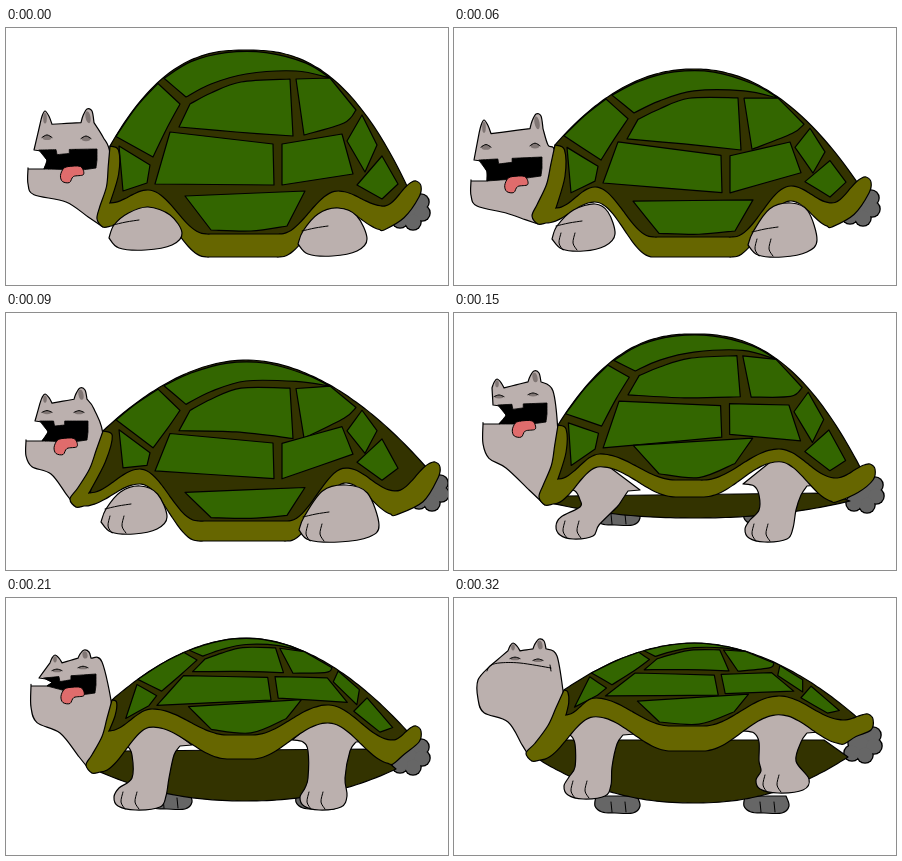
An HTML page with a canvas for the animation above (0.36 s loop, 442 px wide and 257 px high).

```html
<!DOCTYPE html>
<html lang="en">
<head>
<meta charset="utf-8">
<title>Turtle</title>
<style>
  html, body { margin: 0; width: 100%; height: 100%; overflow: hidden; background: #fff; }
  canvas { display: block; width: 442px; height: 257px; }
</style>
</head>
<body>
<canvas id="stage"></canvas>
<script>
const W = 442, H = 257, LOOP = 360, MID = 240;
const DARK = '#333300', GREEN = '#336600', RIM = '#666600';
const SKIN = '#bbb0ae', GREY = '#666666', SHADE = '#807674', TONGUE = '#e06c6c';

// Joints of each pose; every outline is built from them.
// paws: left, right, ground. Standing poses also have a belly and far feet.
const poses = [
  {
    until: 60, top: 22, bow: 2.5, sag: 206, thick: 23, toes: 0,
    tip: [104, 118], notch: [104, 175], foot: [97, 199], arches: [[142, 162], [332, 163]], dip: [378, 178], end: [410, 153],
    paws: [[103, 176, 222], [292, 361, 228]],
    ears: [[39, 83], [82, 81]], lip: [28, 122], hinge: [91, 121], jaw: [22, 141], throat: [60, 174]
  },
  {
    until: 90, top: 41, bow: 2.1, sag: 209, thick: 20, toes: 2,
    tip: [101, 117], notch: [102, 180], foot: [84, 196], arches: [[141, 159], [337, 158]], dip: [378, 175], end: [412, 149],
    paws: [[98, 161, 223], [294, 363, 229]],
    ears: [[30, 92], [83, 86]], lip: [20, 132], hinge: [88, 129], jaw: [17, 153], throat: [52, 185]
  },
  {
    until: 150, top: 47, bow: 1.9, sag: 208, thick: 20, toes: 2,
    tip: [97, 118], notch: [83, 180], foot: [70, 194], arches: [[134, 156], [340, 155]], dip: [390, 178], end: [429, 149],
    paws: [[95, 161, 221], [293, 373, 229]],
    ears: [[39, 81], [75, 75]], lip: [29, 108], hinge: [82, 108], jaw: [20, 128], throat: [45, 161]
  },
  {
    until: 210, top: 21, bow: 2.4, sag: 167, thick: 17, toes: 2, belly: 205, far: 213,
    tip: [104, 112], notch: [104, 166], foot: [91, 192], arches: [[146, 141], [325, 136]], dip: [382, 165], end: [416, 151],
    paws: [[102, 144, 226], [291, 338, 229]],
    ears: [[43, 66], [81, 58]], lip: [39, 92], hinge: [93, 90], jaw: [29, 111], throat: [52, 155]
  },
  {
    until: 270, top: 40, bow: 1.9, sag: 137, thick: 24, toes: 2, belly: 203, far: 212,
    tip: [106, 102], notch: [103, 133], foot: [86, 175], arches: [[146, 111], [322, 107]], dip: [387, 142], end: [410, 128],
    paws: [[108, 159, 212], [294, 340, 212]],
    ears: [[49, 57], [79, 52]], lip: [33, 80], hinge: [90, 76], jaw: [25, 88], throat: [54, 135]
  },
  {
    until: 360, top: 45, bow: 1.9, sag: 128, thick: 25, toes: 2, belly: 205, far: 216, shut: true,
    tip: [110, 92], notch: [112, 117], foot: [78, 163], arches: [[141, 100], [325, 98]], dip: [390, 122], end: [414, 116],
    paws: [[110, 156, 201], [302, 354, 195]],
    ears: [[59, 45], [86, 41]], lip: [36, 68], hinge: [97, 70], jaw: [24, 82], throat: [54, 124]
  }
];

// Plates on the first pose: "/" makes a corner, ";" starts a new plate.
const PLATES = [
  '158,50/185,33 220,23 260,23 300,32 324,47/290,43 240,46 205,56 180,69/158,50',
  '110,106/130,79 152,55/174,76/161,100 147,129/110,106',
  '184,76/205,65 235,54 284,51/287,108/230,104 173,99/184,76',
  '290,51/324,50/350,82/338,95 298,107/290,51',
  '356,87/371,117/359,144/341,113/356,87',
  '376,128/392,156/376,171/351,157/376,128',
  '164,104/267,116/268,157/149,156/164,104',
  '276,116/336,106/347,146/276,157/276,116',
  '113,118/144,137/141,155/117,163/113,118',
  '179,168/299,163/281,198/245,203 205,202/179,168'
].map(text => text.split('/').map(run => run.split(' ').map(p => p.split(',').map(Number))));

const canvas = document.getElementById('stage');
const ctx = canvas.getContext('2d');
const scale = window.devicePixelRatio || 1;
canvas.width = Math.round(W * scale);
canvas.height = Math.round(H * scale);

const mix = (a, b, t) => a + (b - a) * t;
const clamp = (v, lo, hi) => Math.max(lo, Math.min(hi, v));
const move = ([x, y], dx, dy) => [x + dx, y + dy];
const between = (p, q, t) => [mix(p[0], q[0], t), mix(p[1], q[1], t)];
const corners = points => points.map(p => [p]);

function sample(f, from, to, steps = 60) {
  return Array.from({ length: steps + 1 }, (_, i) => {
    const x = mix(from, to, i / steps);
    return [x, f(x)];
  });
}

// Each run is a smooth curve; runs meet in corners.
function shape(runs, fill, width = 1.2) {
  const path = new Path2D();
  let last = null;
  for (const run of runs) {
    const pts = last ? [last, ...run] : run;
    if (!last) path.moveTo(...pts[0]);
    for (let i = 0; i < pts.length - 1; i++) {
      const a = pts[i], b = pts[i + 1];
      const before = pts[i - 1] || a, after = pts[i + 2] || b;
      path.bezierCurveTo(
        a[0] + (b[0] - before[0]) / 6, a[1] + (b[1] - before[1]) / 6,
        b[0] - (after[0] - a[0]) / 6, b[1] - (after[1] - a[1]) / 6,
        b[0], b[1]);
    }
    last = pts[pts.length - 1];
  }
  if (fill) {
    path.closePath();
    ctx.fillStyle = fill;
    ctx.fill(path);
  }
  ctx.lineWidth = width;
  ctx.stroke(path);
}

const line = points => shape([points], null, 1);

function oval(x, y, rx, ry, fill, tilt = 0) {
  ctx.beginPath();
  ctx.ellipse(x, y, rx, ry, tilt, 0, 7);
  ctx.fillStyle = fill;
  ctx.fill();
}

// Height of a bowl or dome that peaks at MID and reaches both end points.
function bowl(x, peak, left, right, power) {
  const side = x < MID ? left : right;
  const u = clamp((x - MID) / (side[0] - MID), 0, 1);
  return mix(peak, side[1], u ** power);
}

const shoulder = p => move(p.end, -9, 5);
const dome = (p, x) => bowl(x, p.top, p.tip, shoulder(p), p.bow);

// Wavy edge of the rim, eased from joint to joint.
function wave(p, x, lower = false) {
  const [a, b] = p.arches;
  const reach = p.belly ? 76 : 58;
  const drop = lower ? p.thick : 0;
  const keys = [
    lower ? move(p.foot, 8, -1) : p.notch,
    move(a, 0, drop * 0.75),
    [a[0] + reach, p.sag + drop],
    [b[0] - reach, p.sag + drop],
    move(b, 0, drop * 0.75),
    move(p.dip, 0, lower ? 24 : 0),
    p.end
  ];
  const i = clamp(keys.findIndex(k => x < k[0]), 1, 6);
  const k = x >= p.end[0] ? 6 : i;
  const [from, to] = [keys[k - 1], keys[k]];
  const t = clamp((x - from[0]) / (to[0] - from[0]), 0, 1);
  return mix(from[1], to[1], (1 - Math.cos(Math.PI * t)) / 2);
}

// Carries a plate point to another pose; flat shells crowd the plates to the top.
function carry(p, [x, y]) {
  const rest = poses[0];
  const flat = clamp((150 - p.sag + p.top) / 130, 0, 1);
  const roof = dome(rest, x);
  const t = clamp((y - roof) / (wave(rest, x) - roof), 0.01, 1);
  const off = x - MID;
  const x2 = x - flat * off * (1 - t) * (1 - (off / 170) ** 2);
  return [x2, mix(dome(p, x2), wave(p, x2), t ** (1 + 0.8 * flat))];
}

function drawShell(p) {
  const right = shoulder(p)[0];
  shape([
    sample(x => dome(p, x), p.tip[0], right),
    [[right, wave(p, right) + 6]],
    sample(x => wave(p, x) + 6, right, p.notch[0])
  ], DARK);
  for (const plate of PLATES) {
    shape(plate.map(run => run.map(point => carry(p, point))), GREEN);
  }
}

function drawRim(p) {
  const { tip, notch, foot, dip, end } = p;
  const bulge = (notch[1] - tip[1]) * 0.15;
  shape([
    [tip, move(tip, bulge, bulge / 2), move(between(tip, notch, 0.5), bulge, 0), notch],
    [...sample(x => wave(p, x), notch[0], end[0]), move(end, 5, 5), move(end, 3, 16),
      [end[0] - 12, mix(end[1], dip[1] + 24, 0.75)],
      ...sample(x => wave(p, x, true), dip[0], foot[0] + 8),
      foot, move(foot, -6, -8), move(between(foot, tip, 0.25), -5, 0),
      between(foot, tip, 0.5), between(foot, tip, 0.75), tip]
  ], RIM);
}

function drawBelly(p) {
  const left = move(p.foot, 6, -2), right = [p.end[0] - 20, p.foot[1] - 4];
  for (const x of [141, 290]) {
    const g = p.far;
    shape([[[x + 1, g - 18], [x, g - 8], [x + 7, g - 2], [x + 20, g - 1], [x + 38, g - 1], [x + 45, g - 8], [x + 42, g - 18]]], GREY);
    for (const toe of [16, 30]) line([[x + toe, g - 12], [x + toe + 1, g - 2]]);
  }
  shape([
    sample(x => bowl(x, p.belly, left, right, 2.2), left[0], right[0]),
    [move(p.arches[1], 45, 44)],
    [move(p.arches[0], -35, 42)]
  ], DARK);
}

function drawLeg(p, [hx, hy], [x0, x1, g]) {
  const mid = (x0 + x1) / 2;
  if (p.belly) {
    shape([
      [[hx, hy + 6], [hx - 36, hy + 35]],
      [[hx - 25, hy + 37], [hx - 20, hy + 46], [hx - 20, g - 32], [x0 + 5, g - 22], [x0, g - 13], [x0 + 4, g - 4],
        [mid - 4, g], [x1 - 5, g - 3], [x1 + 1, g - 14], [hx + 17, g - 32], [hx + 22, hy + 46], [hx + 28, hy + 37]],
      [[hx + 40, hy + 36]]
    ], SKIN);
  } else {
    shape([[
      [x0, g - 12], [x0 + 5, g - 25], [mix(x0, hx, 0.5), hy + 23], [hx, hy + 17], [mix(hx, x1, 0.65), hy + 25],
      [x1, g - 17], [x1 - 10, g - 5], [mid, g], [x0 + 10, g - 2], [x0, g - 12]
    ]], SKIN);
    line([[x0 + 4, g - 25], [x0 + 17, g - 28], [x0 + 30, g - 30]]);
  }
  for (let i = 0; i < p.toes; i++) {
    const x = x0 + 9 + i * 14;
    line([[x, g - 18], [x - 2, g - 8], [x + 2, g - 1]]);
  }
}

function drawTail(p) {
  const [x, y] = move(p.end, 15, 12);
  const puffs = [[-22, 16, 13], [-10, 9, 8], [-9, 20, 8], [-18, 29, 8], [-31, 27, 8]];
  for (const [grow, fill] of [[0.8, '#000'], [-0.5, GREY]]) {
    for (const [dx, dy, r] of puffs) oval(x + dx, y + dy, r + grow, r + grow, fill);
  }
}

function drawHead(p) {
  const { lip, hinge, jaw, throat, foot, tip, notch } = p;
  const [front, back] = p.ears;
  const low = (lip[1] - front[1]) * 0.34, high = (hinge[1] - back[1]) * 0.34;
  const gape = p.shut ? [] : [
    [move(lip, 7, 1)],
    [[lip[0] + 13, mix(lip[1], jaw[1], 0.55)], [jaw[0] + 16, jaw[1]]],
    [jaw]
  ];
  shape([
    [notch, move(tip, 0, 8), move(hinge, 6, -12), move(back, 6, high)],
    [move(back, 4, 2), move(back, -1, 0), move(back, -5, high * 0.5), move(back, -7, high)],
    [between(move(back, -7, high), move(front, 7, low), 0.5), move(front, 7, low)],
    [move(front, 4, low * 0.4), front, move(front, -3, low * 0.4), move(front, -5, low)],
    [between(move(front, -5, low), lip, 0.4), lip],
    ...gape,
    [jaw, [jaw[0], mix(jaw[1], throat[1], 0.45)], [jaw[0] + 6, mix(jaw[1], throat[1], 0.78)], throat,
      between(throat, foot, 0.6), foot]
  ], SKIN);

  oval(front[0], front[1] + low * 0.55, 1.8, low * 0.4, SHADE);
  oval(back[0], back[1] + high * 0.6, 2.5, high * 0.45, SHADE, -0.2);
  const open = (lip[1] - front[1]) / 15;
  for (const [x, y] of [[front[0] + 2, mix(front[1], lip[1], 0.68)], [back[0] - 2, mix(back[1], hinge[1], 0.74)]]) {
    oval(x, y, 4.5, open, SHADE);
    line([[x - 5, y], [x, y - open], [x + 5, y]]);
  }

  if (p.shut) {
    line([move(jaw, 9, -9), lip, move(lip, 9, -3), move(lip, 30, -3), hinge]);
    line([move(hinge, -1, -3), move(hinge, 0, 3)]);
    return;
  }
  const tooth = [0.35, 0.56].map(t => between(lip, hinge, t));
  const corner = move(hinge, -1, 19);
  shape(corners([
    move(lip, 5, 0), tooth[0], move(tooth[0], 1, 5), move(tooth[1], 0, 4), tooth[1], hinge,
    move(hinge, 0, 11), corner, move(corner, -14, 2), [jaw[0] + 16, jaw[1]],
    [lip[0] + 13, mix(lip[1], jaw[1], 0.55)]
  ]), '#000', 0.8);
  const root = [mix(jaw[0], hinge[0], 0.63), mix(jaw[1], corner[1], 0.5) + 4];
  const lick = [[-3, -6], [9, -6], [12, 2], [2, 4], [-2, 10], [-9, 9], [-11, 3], [-8, -4], [-3, -6]];
  shape([lick.map(d => move(root, ...d))], TONGUE, 1);
}

function draw(p) {
  ctx.setTransform(scale, 0, 0, scale, 0, 0);
  ctx.fillStyle = '#fff';
  ctx.fillRect(0, 0, W, H);
  ctx.strokeStyle = '#000';
  ctx.lineJoin = ctx.lineCap = 'round';

  const legs = () => p.paws.forEach((paw, i) => drawLeg(p, p.arches[i], paw));
  drawTail(p);
  if (p.belly) drawBelly(p);
  drawHead(p);
  drawShell(p);
  if (p.belly) legs();
  drawRim(p);
  if (!p.belly) legs();
}

let shown = null;
const start = performance.now();

function tick() {
  const t = (performance.now() - start) % LOOP;
  const pose = poses.find(p => t < p.until);
  if (pose !== shown) draw(shown = pose);
  requestAnimationFrame(tick);
}
tick();
</script>
</body>
</html>
```
